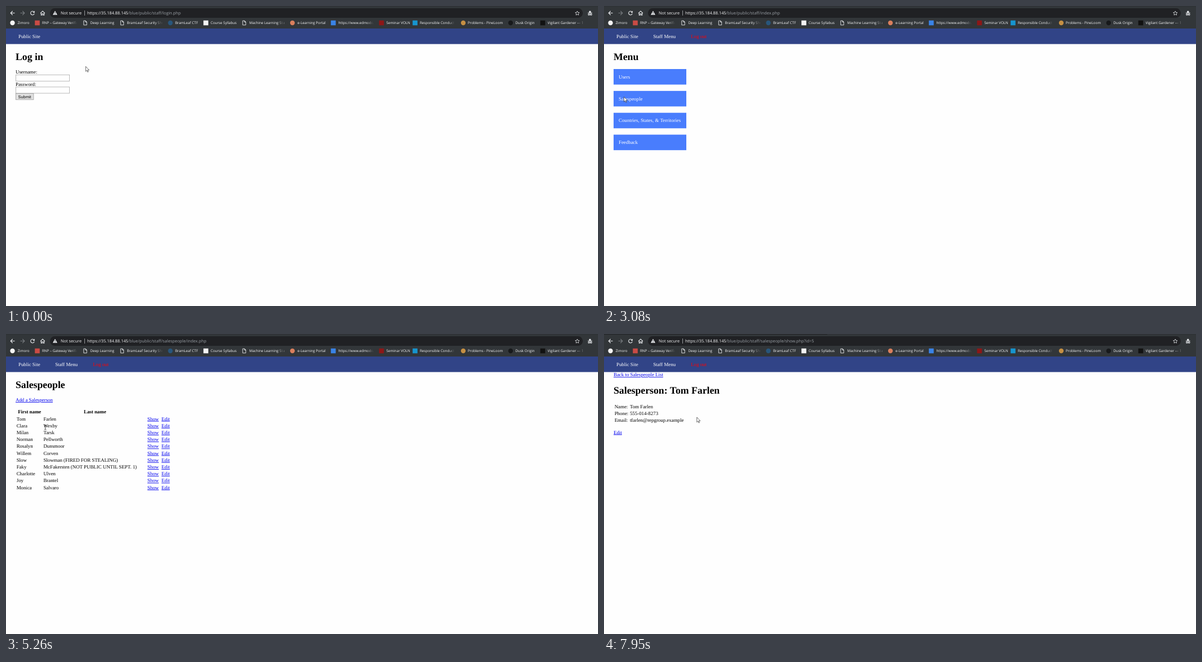
Write an HTML page that moves like this. It is 1050 px wide and 533 px high and loops after 8 s.

```html
<!DOCTYPE html>
<html lang="en">
<head>
<meta charset="utf-8">
<title>Staff site</title>
<style>
  html, body { margin: 0; width: 100%; height: 100%; overflow: hidden; background: #fefefe; }
  svg { display: block; }
  text { font: 8.87px "Liberation Serif", serif; white-space: pre; text-rendering: geometricPrecision; }
  .ui { font: 7.35px "Open Sans", sans-serif; fill: #f4f5f6; }
  .mark { font: 6.25px "Open Sans", sans-serif; fill: #f6f7f8; }
  .dim { fill: #9aa0a6; }
  .h1 { font-size: 17.74px; font-weight: bold; }
  .th { font-weight: bold; text-anchor: middle; }
  .form { font: 7.39px "Liberation Sans", sans-serif; }
  .light { fill: #fff; }
  .red { fill: #f00; }
  .link { fill: #00e; text-decoration: underline; }
  .line { fill: none; stroke: #e8eaed; stroke-width: 1.1; }
</style>
</head>
<body>
<svg id="stage" width="1050" height="533" viewBox="0 0 1050 533"></svg>
<script>
const text = (x, y, s, cls = '', id = '') => `<text x="${x}" y="${y}" class="${cls}" id="${id}">${s}</text>`;
const rect = (x, y, w, h, fill, more = '') =>
  `<rect x="${x}" y="${y}" width="${w}" height="${h}" fill="${fill}" ${more}/>`;
const path = (d, more = 'class="line"') => `<path d="${d}" ${more}/>`;
const group = (id, s) => `<g id="${id}">${s}</g>`;

const BAR = '#323639', LOOP = 8000;

// icon x, shape, colour, label x, label
const bookmarks = [
  [11.5, 'circle', '#f4f4f4', 20.5, 'Zimoro'],
  [55.5, 'square', '#c94b45', 64, 'RNP – Gateway Verification'],
  [140.5, 'page', '', 149.5, 'Deep Learning'],
  [206, 'page', '', 214.5, 'BramLeaf Security Shelf'],
  [291.5, 'circle', '#28567c', 300, 'BramLeaf CTF'],
  [354.5, 'square', '#f4f4f4', 363, 'Course Syllabus'],
  [422.5, 'page', '', 431.5, 'Machine Learning Start'],
  [508, 'circle', '#d97f5d', 517, 'e-Learning Portal'],
  [580.5, 'square', '#3a83e6', 589.5, 'https://www.edmodo.com'],
  [666, 'square', '#8c1717', 674.5, 'Seminar VOLN'],
  [725.5, 'square', '#1795cf', 734, 'Responsible Conduct of'],
  [811, 'circle', '#c58f43', 819, 'Problems - PineLoom'],
  [895, 'circle', '#17191b', 903.5, 'Dusk Origin'],
  [952, 'square', '#111', 960.5, 'Vigilant Gardener — Tips']
];

function icon(x, shape, fill) {
  if (shape == 'circle') return `<circle cx="${x}" cy="30" r="4.2" fill="${fill}"/>`;
  if (shape == 'square') return rect(x - 4.3, 25.7, 8.6, 8.6, fill);
  return path(`M${x - 2.7} 26.2h3.4l2 2v5.6h-5.4zM${x + .5} 26.2v2.3h2.2`, 'class="line" style="stroke-width:.9"');
}

const bookmark = ([x, shape, fill, tx, label]) => icon(x, shape, fill) +
  `<svg x="${tx}" y="22" width="62" height="17">${text(0, 10.2, label, 'mark')}` +
  (label.length > 19 ? rect(50, 0, 12, 17, 'url(#fade)') : '') + '</svg>';

const toolbar = rect(0, 0, 1050, 40, BAR) + rect(0, 0, 1050, 1, '#2d3034') +
  rect(0, 0, 396, 1, '#202124', 'id="tab"') +
  rect(78, 4, 945, 17, '#202124', 'rx="8.5"') +
  path('M15.5 12.5H8.5M11.7 9L8.2 12.5L11.7 16') +
  path('M25.5 12.5H32.5M29.3 9L32.8 12.5L29.3 16', 'class="line" style="stroke:#777b7f"') +
  group('reload', path('M49.3 10.2A3.3 3.3 0 1 0 50.2 13.3') + path('M50.8 8.6v3.5h-3.5z', 'fill="#e8eaed"')) +
  group('stop', path('M44.2 9.5l6 6M50.2 9.5l-6 6')) +
  path('M61 12.8L65 9L69 12.8M62.3 12V16.2H64V13.7H66V16.2H67.7V12') +
  path('M87 8.6L91 15.8H83z', 'fill="#e8eaed"') + rect(86.6, 11, .9, 2.3, '#202124') + rect(86.6, 14, .9, .9, '#202124') +
  text(97, 15.1, 'Not secure', 'ui') + rect(139, 8, .8, 9, '#b5b8bb') +
  text(144, 15.1, 'https://', 'ui') + text(168.7, 15.1, '35.184.88.145', 'ui') + text(216.3, 15.1, '', 'ui dim', 'url') +
  path('M1013.3 9l1.1 2.4 2.6.3-1.9 1.8.5 2.6-2.3-1.3-2.3 1.3.5-2.6-1.9-1.8 2.6-.3z', 'class="line" style="stroke-width:.8"') +
  path('M1031.7 12.5v-.8h2l.8-2.9h2.6l.8 2.9h2v.8z', 'fill="#e8eaed"') +
  '<g class="line"><circle cx="1034" cy="14.9" r="1.3"/><circle cx="1037.7" cy="14.9" r="1.3"/></g>' +
  bookmarks.map(bookmark).join('');

const field = (y, id) => rect(17.4, y, 95.2, 11.1, '#fff', `id="${id}" stroke="#a9a9a9" stroke-width=".8"`);

const people = ['ffellow', 'aarbor', 'mmeadow', 'ccanvas', 'ttundra'];
const popup = rect(16.5, 134, 141, 131, '#fff', 'stroke="#c8c8c8" stroke-width=".6"') +
  rect(16.8, 134.3, 140.4, 26, '#e8e8e8', 'id="pick"') +
  people.map((p, i) => text(24, 150 + i * 26.1, p, 'form')).join('');

const login = text(17, 95.7, 'Log in', 'h1') + text(17, 119.9, 'Username:') + text(17, 141.5, 'Password:') +
  field(122.3, 'user') + field(143.9, 'pass') +
  text(18.3, 130.3, people[0], 'form', 'name') + group('dots', '') + rect(18.2, 145, .8, 9, '#000', 'id="caret"') +
  rect(17.3, 155.5, 31.6, 10.8, '#e1e1e1', 'stroke="#9b9b9b" stroke-width=".8"') +
  text(21.6, 163.5, 'Submit', 'form') + group('popup', popup);

const menu = text(17, 95.7, 'Menu', 'h1') +
  ['Users', 'Salespeople', 'Countries, States, &amp; Territories', 'Feedback'].map((s, i) => {
    const y = 112 + i * 38.85;
    return rect(17, y, 129, 27.6, '#497dfd', 'class="item"') + text(26, y + 16.7, s, 'light');
  }).join('');

const staff = ['Tom Farlen', 'Clara Wexby', 'Milan Tarsk', 'Norman Pellworth', 'Rosalyn Dunsmoor', 'Willem Corven',
  'Slow Slowman (FIRED FOR STEALING)', 'Faky McFakersten (NOT PUBLIC UNTIL SEPT. 1)',
  'Charlotte Ulven', 'Joy Brantel', 'Monica Salvaro'];

const list = text(17, 95.7, 'Salespeople', 'h1') + text(17, 119.9, 'Add a Salesperson', 'link') +
  text(41.7, 141.3, 'First name', 'th') + text(157.8, 141.3, 'Last name', 'th') +
  staff.map((s, i) => {
    const y = 153.6 + i * 12.2, gap = s.indexOf(' ');
    return text(18.7, y, s.slice(0, gap)) + text(66.4, y, s.slice(gap + 1)) +
      text(250.8, y, 'Show', 'link') + text(275.8, y, 'Edit', 'link');
  }).join('');

const details = { Name: staff[0], Phone: '555-014-8273', Email: 'tfarlen@repgroup.example' };
const show = text(17, 75.4, 'Back to Salespeople List', 'link') +
  text(17, 105.6, 'Salesperson: ' + staff[0], 'h1') +
  Object.entries(details).map(([k, v], i) =>
    text(18.7, 131.5 + i * 12.2, k + ':') + text(45.9, 131.5 + i * 12.2, v)).join('') +
  text(17, 177.5, 'Edit', 'link');

const ink = 'fill="#fff" stroke="#111" stroke-width=".6" stroke-linejoin="round"';
const cursors = {
  arrow: path('M.4.4V9.2L2.4 7.3L3.8 10.4L5.1 9.8L3.7 6.8H6.5z', ink),
  beam: path('M-1.7-4H-.4L0-3.6L.4-4H1.7M0-3.6V3.6M-1.7 4H-.4L0 3.6L.4 4H1.7', 'fill="none" stroke="#222" stroke-width=".8"'),
  hand: path('M-1 1Q0-.4 1 1V4.6Q2 3.8 2.8 4.9Q3.8 4.2 4.5 5.3Q5.9 4.8 6 6.2V8.5L5 11.7H0L-3.2 7.6Q-2.9 6.3-1 7.6z', ink)
};

const pages = { login, menu, list, show };
document.getElementById('stage').innerHTML =
  `<defs><linearGradient id="fade"><stop stop-color="${BAR}" stop-opacity="0"/><stop offset="1" stop-color="${BAR}"/></linearGradient></defs>` +
  rect(0, 0, 1050, 533, '#fefefe') + rect(0, 40, 1050, 27.6, '#314487') + text(22, 57.2, 'Public Site', 'light') +
  group('staffNav', text(87.2, 57.2, 'Staff Menu', 'light') + text(154.2, 57.2, 'Log out', 'red')) +
  Object.entries(pages).map(([id, s]) => group(id, s)).join('') + toolbar +
  group('cursor', Object.entries(cursors).map(([id, s]) => group(id, s)).join(''));

// first step, last step, steps, x, y, shape
const moves = [
  [90, 270, 3, 90, 120, 'arrow'], [360, 450, 2, 75, 128, 'beam'], [730, 910, 3, 60, 150, 'arrow'],
  [1180, 1350, 3, 70, 150, 'beam'], [2440, 2800, 5, 35, 161, 'arrow'],
  [3260, 3620, 5, 70, 152, 'hand'], [3800, 3800, 1, 70, 149, 'arrow'], [3890, 3890, 1, 70, 154, 'hand'],
  [4260, 4350, 2, 71, 137, 'hand'], [4530, 4620, 2, 69.7, 135.7, 'hand'],
  [4900, 5080, 3, 70, 165, 'hand'], [5260, 5530, 4, 69, 168, 'beam'], [5620, 5620, 1, 87, 151, 'beam'],
  [5710, 5710, 1, 289, 29, 'arrow'], [5800, 5800, 1, 289, -20, 'arrow'], [5990, 5990, 1, 950, -5, 'arrow'],
  [6080, 6080, 1, 600, -4, 'arrow'], [6160, 6160, 1, 300, 6, 'arrow'], [6240, 6240, 1, 190, 20, 'arrow'],
  [6420, 6600, 3, 90, 120, 'arrow'], [6690, 6780, 2, 146, 145, 'beam'], [6870, 7050, 3, 328, 156, 'arrow'],
  [7140, 7140, 1, 291, 150, 'hand'], [7230, 7320, 2, 262, 149, 'hand'], [7680, 7680, 1, 262, 149, 'arrow'],
  [7860, 7950, 2, 164.3, 147.5, 'arrow']
];

function pointer(t) {
  let x = 141, y = 107, kind = 'arrow';
  for (const [a, b, n, toX, toY, shape] of moves) {
    if (t < a) break;
    const step = n > 1 ? Math.floor((t - a) / (b - a) * (n - 1) + .01) + 1 : 1;
    const f = Math.min(1, step / n);
    x += (toX - x) * f;
    y += (toY - y) * f;
    kind = shape;
  }
  return { x, y, kind };
}

const $ = id => document.getElementById(id);
const visible = (id, on) => $(id).style.display = on ? '' : 'none';
const items = document.querySelectorAll('.item');
const urls = { login: 'login', menu: 'index', list: 'salespeople/index', show: 'salespeople/show' };

function focus(id, on, fill = '#fff') {
  $(id).setAttribute('stroke', on ? '#4d8ae8' : '#a9a9a9');
  $(id).setAttribute('fill', fill);
}

function draw(t) {
  const during = (a, b) => t >= a && t < b;
  const page = t < 3080 ? 'login' : t < 5260 ? 'menu' : t < 7680 ? 'list' : 'show';
  for (const id in pages) visible(id, id == page);
  visible('staffNav', page != 'login');
  $('url').textContent = `/blue/public/staff/${urls[page]}.php${page == 'show' ? '?id=5' : ''}`;

  const loading = during(2800, 3080) || during(5080, 5260) || during(7500, 7680);
  visible('stop', loading);
  visible('reload', !loading);
  visible('tab', t >= 6240);

  const filled = t >= 1090;
  focus('user', during(450, 1440), filled ? '#faffbd' : '#fff');
  focus('pass', during(1440, 2710));
  visible('name', filled);
  visible('popup', during(450, 1090));
  visible('pick', t >= 820);
  visible('caret', during(1530, 2000));
  const typed = t < 2180 ? 0 : Math.min(8, 2 * Math.floor((t - 2180) / 89 + 1));
  $('dots').innerHTML = Array.from({ length: typed }, (_, i) =>
    `<circle cx="${20 + i * 3.3}" cy="149.5" r="1.25"/>`).join('');

  const { x, y, kind } = pointer(t);
  const hot = kind == 'hand' ? Math.floor((y - 112) / 38.85) : -1;
  items.forEach((item, i) => item.setAttribute('fill', i == hot ? '#3e6fe0' : '#497dfd'));
  for (const id in cursors) visible(id, id == kind);
  $('cursor').setAttribute('transform', `translate(${x} ${y})`);
}

function frame() {
  draw(performance.now() % LOOP);
  requestAnimationFrame(frame);
}
frame();
</script>
</body>
</html>
```
